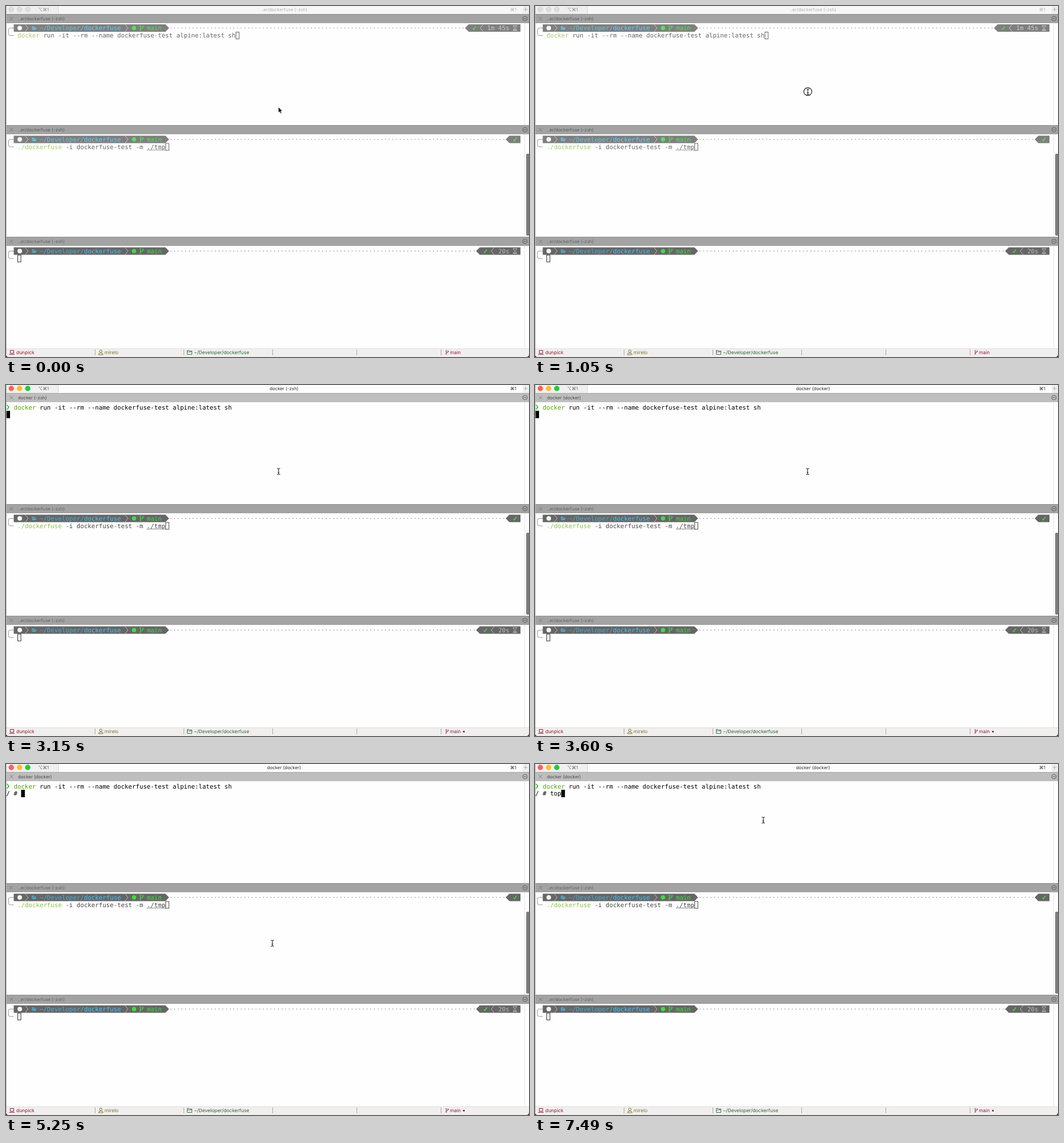
Animation, 913 px wide and 613 px high, one loop 8000 ms. Source, as an HTML page:

```html
<!DOCTYPE html>
<html lang="en">
<head>
<meta charset="utf-8">
<title>Terminal session</title>
<style>
html, body { margin: 0; width: 100%; height: 100%; overflow: hidden; background: #fefefe; }
svg { display: block; width: 913px; height: 613px; }
text { white-space: pre; text-rendering: geometricPrecision; }
.mono { font: 10.725px "DejaVu Sans Mono", monospace; }
.ui { font: 7.85px Inter, "DejaVu Sans", sans-serif; }
.status { font: 8.4px Inter, "DejaVu Sans", sans-serif; }
.line { fill: none; stroke-width: 1; }

.active { --bar: #2e2e2e; --path: #0d8fbc; --dir: #14b2f7; --git: #1cc81c; --cmd: #57a200; --ink: #000; --soft: #a8a8a8; --dots: #777; --head: #bebebe; --label: #4c4c4c; }
.dim { --bar: #666; --path: #4babce; --dir: #45c0fb; --git: #41dc41; --cmd: #8cc24b; --ink: #484848; --soft: #bababa; --dots: #868686; --head: #a3a3a3; --label: #646464; }
.faded { --bar: #7f7f7f; --path: #68c0df; --dir: #66cbfc; --git: #58df58; --cmd: #a8ca68; --ink: #666; --soft: #cacaca; --dots: #929292; --head: #a3a3a3; --label: #5c5c5c; }

#window { --title: #fdfdfd; --tab: #f0f0f0; --name: #2c2c2c; --key: #666; }
#window.blurred { --title: #f6f6f6; --tab: #eee; --name: #b4b4b4; --key: #8c8c8c; }
</style>
</head>
<body>
<svg id="stage" viewBox="0 0 913 613" xmlns="http://www.w3.org/2000/svg"></svg>
<script>
const LOOP = 8000;
const CELL = 6.457;
const col = n => 0.6 + n * CELL;
const stage = document.getElementById('stage');

const rect = (x, y, w, h, fill, more = '') =>
  `<rect x="${x}" y="${y}" width="${w}" height="${h}" fill="${fill}" ${more}/>`;
const path = (d, stroke, more = '') =>
  `<path class="line" d="${d}" stroke="${stroke}" ${more}/>`;
const shape = (d, fill) => `<path d="${d}" fill="${fill}"/>`;
const mono = (n, y, fill, s, more = '') =>
  `<text class="mono" x="${col(n)}" y="${y}" fill="${fill}" ${more}>${s}</text>`;
const label = (cls, x, y, fill, s, more = '') =>
  `<text class="${cls}" x="${x}" y="${y}" fill="${fill}" ${more}>${s}</text>`;
const dot = (x, y, r, fill, more = '') =>
  `<circle cx="${x}" cy="${y}" r="${r}" fill="${fill}" ${more}/>`;
const at = (x, y, s) => `<g transform="translate(${x} ${y})">${s}</g>`;

const chevron = (n, dir) =>
  path(`M${col(n + .5) - 2.4 * dir} 32.5l${5 * dir} 6l${-5 * dir} 6`, 'var(--soft)', 'stroke-width=".8"');
const check = n =>
  at(col(n + .5), 38.5, path('M-2.6 .7L-1 2.8L2.7 -3', 'var(--git)', 'style="stroke-width:1.5"'));
const hourglass = at(col(137.5), 38.5,
  path('M-3.7 -4.2H3.7M-3.7 4.2H3.7M-2.6 -4C-2.6 -1.5 -.6 -1 -.6 0S-2.6 1.5 -2.6 4M2.6 -4C2.6 -1.5 .6 -1 .6 0S2.6 1.5 2.6 4', 'var(--soft)')
  + shape('M-2 3.8Q0 .8 2 3.8Z', 'var(--soft)'));
const branch = (x, y, color, k) =>
  `<g transform="translate(${x} ${y}) scale(${k})">`
  + path('M-2 -2.6V2.6M2.4 -1.6Q2.4 .6 -2 1', color, 'style="stroke-width:1.2"')
  + [[-2, -3.6], [-2, 3.6], [2.4, -2.6]].map(([a, b]) =>
      dot(a, b, 1.1, 'none', `stroke="${color}"`)).join('') + '</g>';
const openFolder = at(49.2, 38.5,
  shape('M-4 2.6V-3H-1L0 -2H2.8V-.9H-2L-3.6 2.2Z', 'var(--path)')
  + shape('M-1.6 -.3H4.4L2.6 3H-3.6Z', 'var(--path)'));

// Prompt line; 'first' is the column where the right-hand segment begins.
function prompt(first, right) {
  const tip = col(first), end = col(139);
  return path('M14 38.5H7.5Q4.3 38.5 4.3 41.7V48.3Q4.3 51.5 7.5 51.5H13.5', '#959595')
    + shape(`M${col(2)} 32H${col(43)}L${col(44)} 38.5L${col(43)} 45H${col(2)}Z`, 'var(--bar)')
    + shape(`M${end} 32H${tip + CELL}L${tip} 38.5L${tip + CELL} 45H${end}Z`, 'var(--bar)')
    + dot(24, 38.5, 4, '#f4f4f4')
    + chevron(5, 1) + openFolder
    + mono(9, 42.3, 'var(--path)', '~/Developer/')
    + mono(21, 42.3, 'var(--dir)', 'dockerfuse', 'font-weight="bold"')
    + chevron(32, 1)
    + dot(223.5, 38.5, 3.7, 'var(--git)')
    + branch(236.6, 38.5, 'var(--git)', 1)
    + mono(38, 42.3, 'var(--git)', 'main')
    + path(`M${col(44.5) - .65} 38.5H${tip - 1}`, 'var(--dots)', `style="stroke-width:1.3" stroke-dasharray="1.3 ${CELL - 1.3}"`)
    + right;
}

const took = (n, s) => chevron(n, -1) + mono(n + 2, 42.3, 'var(--soft)', s) + hourglass;
const hollow = n => rect(col(n) + .5, 45.5, CELL - .9, 12, 'none', 'stroke="var(--ink)"');

const head = id =>
  rect(0, 14, 913, 16, 'var(--head)')
  + path('M0 14.5H913', '#000', 'opacity=".12"')
  + path('M6.5 19L12.5 25M12.5 19L6.5 25', '#707070', 'style="stroke-width:.8"')
  + label('ui', 21, 24.9, 'var(--label)', '..er/dockerfuse (-zsh)', `id="${id}"`)
  + dot(906, 22, 4, 'none', 'stroke="#5c5c5c" stroke-width=".9"')
  + path('M903.8 22H908.2', '#5c5c5c');

const pane = (id, headY, bodyY, body) =>
  `<g id="${id}">${at(0, headY, head(id + 'Head'))}${at(0, bodyY, body)}</g>`;

const runLine = '<tspan fill="var(--cmd)">docker</tspan> run -it --rm --name dockerfuse-test alpine:latest sh';

const top1 = `<g id="ready">${prompt(124, check(126) + took(128, '1m 45s'))}`
  + mono(3, 55.2, 'var(--ink)', runLine) + `<g id="box">${hollow(62)}</g></g>`
  + '<g id="session">' + path('M1.8 34.8L5 38.8L1.8 42.8', '#1ccc1c', 'style="stroke-width:1.6"')
  + mono(2, 42.5, '#000', runLine)
  + mono(0, 55.2, '#000', '', 'id="shell"') + '</g>'
  + rect(0, 45, CELL, 13, '#000', 'id="caret"');

const top2 = prompt(135, check(137))
  + mono(3, 55.2, 'var(--ink)', '<tspan fill="var(--cmd)">./dockerfuse</tspan> -i dockerfuse-test -m ./tmp')
  + path(`M${col(38)} 57H${col(43)}`, 'var(--ink)', 'stroke-dasharray="1.5 .7"')
  + hollow(43);

const top3 = prompt(127, check(129) + took(131, '20s'))
  + rect(col(3) + .5, 45.5, CELL - .9, 12, 'none', 'stroke="#2c2c2c"');

const titleBar = rect(0, 0, 913, 14, 'var(--title)') + rect(0, 0, 91, 14, 'var(--tab)')
  + path('M91.5 0V14', '#dcdcdc') + rect(902, 0, 11, 14, 'var(--tab)')
  + [9.3, 23.7, 38].map(x => dot(x, 6, 4.4, '#ddd', 'class="light" stroke="#c8c8c8" stroke-width=".6"')).join('')
  + label('ui', 56, 8.8, 'var(--key)', '⌥⌘1')
  + label('ui', 485.3, 8.8, 'var(--name)', '', 'id="title" text-anchor="middle"')
  + label('ui', 891, 8.8, 'var(--name)', '⌘1', 'text-anchor="end"')
  + path('M903.5 6H910.5M907 2.5V9.5', '#b0b0b0');

const RED = '#8b2030', OLIVE = '#7d7a30', GREEN = '#2c6b3a', PLUM = '#85204c';
const statusBar = rect(0, 598, 913, 15, '#f1eeee') + path('M0 598.5H913', '#e0dddd')
  + [155.5, 310.5, 465.5, 612.5, 759.5].map(x => path(`M${x} 600V610`, '#a8a6a6')).join('')
  + path('M7.5 601.5H13.5V606.5H7.5ZM5.5 608.5H15', RED)
  + label('status', 18, 608.2, RED, 'dunpick')
  + dot(165.5, 603, 2.2, 'none', `stroke="${OLIVE}"`)
  + path('M161.5 609Q161.5 606 165.5 606T169.5 609Z', OLIVE)
  + label('status', 172, 608.2, OLIVE, 'mirelo')
  + path('M316.5 608.5V601.5H319.5L320.5 602.5H324.5V608.5ZM316.5 604H324.5', GREEN, 'style="stroke-width:.9"')
  + label('status', 328, 608.2, GREEN, '~/Developer/dockerfuse')
  + branch(770, 605, PLUM, .75)
  + label('status', 775, 608.2, PLUM, 'main')
  + dot(799.3, 605.3, 1.6, PLUM, 'id="dirty"')
  + shape('M0 608Q0 613 5 613H0Z', '#5a1220') + shape('M913 608Q913 613 908 613H913Z', '#5a1220');

const pointer =
  '<g id="arrow"><path d="M0 0V10L2.3 7.9L4 11.6L5.7 10.8L4.1 7.3H7.2Z" fill="#000" stroke="#fff" stroke-width=".7"/></g>'
  + '<g id="beam">' + dot(0, -.5, 7, 'none', 'id="ring" stroke="#111" stroke-width="1.1"')
  + path('M-2.8 -5.3Q0 -5.3 0 -3.6Q0 -5.3 2.8 -5.3M-2.8 5.3Q0 5.3 0 3.6Q0 5.3 2.8 5.3M0 -4V4M-1.4 1.5H1.4', '#222', 'style="stroke-width:1.1"')
  + '</g>';

stage.innerHTML = '<g id="window">' + rect(0, 0, 913, 613, '#fefefe', 'id="paper"')
  + path('M905.5 30V598', '#e6e6e6') + titleBar
  + pane('p1', 0, 0, top1) + pane('p2', 194, 194.5, top2) + pane('p3', 389, 389.5, top3)
  + rect(908, 258, 6, 143, '#7e7e7e', 'rx="2"')
  + statusBar + path('M.5 0V608', '#b8b8b8') + pointer + '</g>';

const $ = id => document.getElementById(id);
const show = (id, on) => $(id).setAttribute('visibility', on ? 'inherit' : 'hidden');
const set = (id, key, value) => $(id).setAttribute(key, value);
const lights = [...document.querySelectorAll('.light')];
const LIT = ['#fe5f57', '#febc2e', '#28c840'];

// Last entry whose start time has passed.
const pick = (steps, t) => steps.filter(s => s[0] <= t).pop();

const MOUSE = [
  [0, 'arrow', 475.5, 176.5], [600, 'arrow', 475.5, 160], [750, 'arrow', 475.5, 151],
  [1050, 'ring', 476.3, 150], [1200, 'beam', 475.8, 151], [4650, 'beam', 491.5, 194.5],
  [4800, 'beam', 469, 304], [4950, 'beam', 465, 313], [5840, 'beam', 464.5, 302],
  [5990, 'beam', 398.5, 98], [6290, 'ring', 398.8, 97.5], [6440, 'beam', 398.5, 98]
];
const TITLES = [[0, '..er/dockerfuse (-zsh)'], [3150, 'docker (-zsh)'], [3600, 'docker (docker)']];
const SHELL = [[0, ''], [5250, '/ # '], [7340, '/ # t'], [7490, '/ # top']];

function draw(t) {
  const focused = t >= 1200, running = t >= 3150;
  set('window', 'class', focused ? '' : 'blurred');
  set('p1', 'class', focused ? 'active' : 'faded');
  set('p2', 'class', focused ? 'dim' : 'faded');
  set('p3', 'class', 'dim');
  set('paper', 'fill', focused && !running ? '#f9f9f8' : '#fefefe');
  lights.forEach((l, i) => {
    l.setAttribute('fill', focused ? LIT[i] : '#ddd');
    l.setAttribute('stroke', focused ? LIT[i] : '#c8c8c8');
  });
  show('dirty', focused);

  const title = pick(TITLES, t)[1], typed = pick(SHELL, t)[1];
  $('title').textContent = title;
  $('p1Head').textContent = title;
  $('shell').textContent = typed;
  show('ready', !running);
  show('session', running);
  show('box', !focused);
  show('caret', focused);
  set('caret', 'x', col(running ? typed.length : 62));

  const [, kind, x, y] = pick(MOUSE, t);
  const place = `translate(${x} ${y})`;
  show('arrow', kind === 'arrow');
  show('beam', kind !== 'arrow');
  show('ring', kind === 'ring');
  set('arrow', 'transform', place);
  set('beam', 'transform', place);
}

function tick() {
  draw(performance.now() % LOOP);
  requestAnimationFrame(tick);
}
tick();
</script>
</body>
</html>
```
